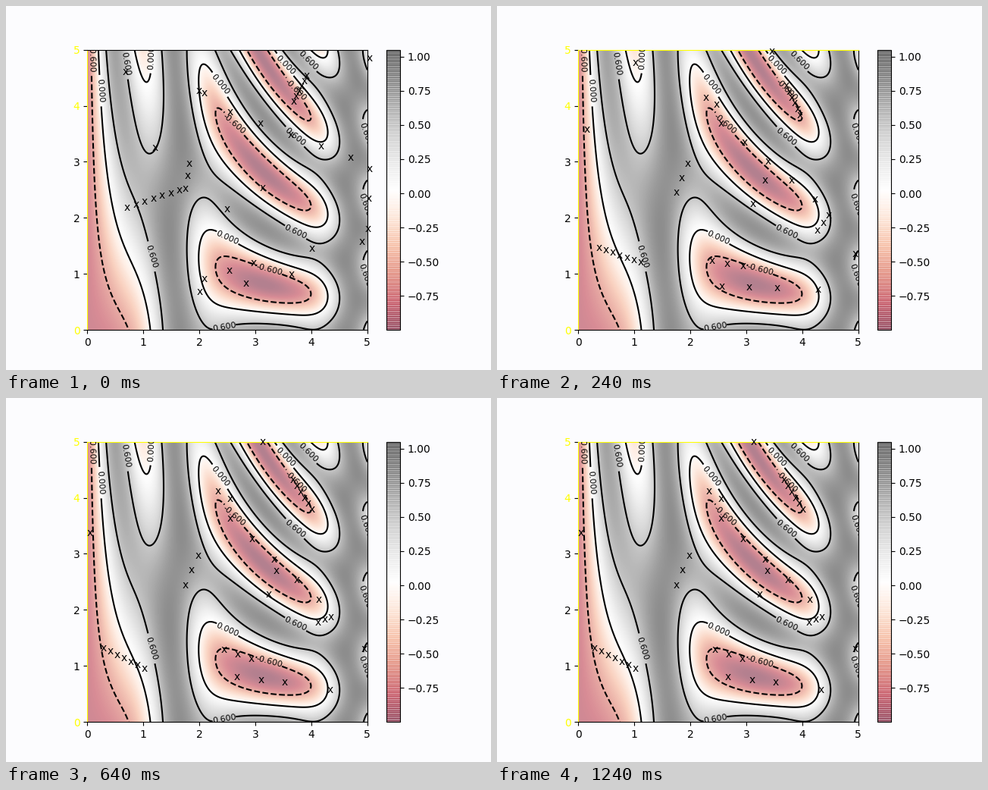
Recreate the animation shown at these times as a matplotlib script. Size 640 by 480 pixels, loop 1.28 s.

```python
import numpy as np
import matplotlib.pyplot as plt
from matplotlib.animation import FuncAnimation

FRAMES, STEP = 32, 40
PACE = 4.48       # frames in which the walkers cover most of their way
YELLOW = "#ffff00"

# Walkers travel in rows: count, both ends of the row at first and at rest.
ROWS = [
    (2, (0.63, 4.55), (1.15, 3.20), (-0.004, 3.32), (0.93, 5.02)),
    (7, (0.66, 2.13), (1.59, 2.44), (0.24, 1.26), (0.96, 0.90)),
    (3, (1.70, 2.47), (1.77, 2.91), (1.70, 2.39), (1.92, 2.91)),
    (2, (1.94, 4.21), (2.04, 4.17), (2.28, 4.06), (2.49, 3.93)),
    (5, (2.50, 3.83), (4.65, 3.02), (2.49, 3.58), (4.08, 2.12)),
    (2, (2.44, 2.10), (3.07, 2.48), (3.18, 2.22), (3.32, 2.64)),
    (3, (4.96, 1.75), (4.99, 2.82), (4.07, 1.72), (4.30, 1.82)),
    (2, (4.85, 1.52), (3.96, 1.39), (4.89, 1.25), (4.28, 0.52)),
    (6, (3.86, 4.48), (3.63, 4.02), (3.62, 4.27), (3.96, 3.73)),
    (1, (4.99, 4.79), (4.99, 4.79), (3.08, 4.94), (3.08, 4.94)),
    (3, (2.03, 0.86), (2.92, 1.14), (2.39, 1.24), (2.88, 1.07)),
    (3, (1.96, 0.63), (3.59, 0.93), (2.62, 0.74), (3.47, 0.65)),
]

start = np.vstack([np.linspace(a, b, n) for n, a, b, _, _ in ROWS])
rest = np.vstack([np.linspace(c, d, n) for n, _, _, c, d in ROWS])


def height(x, y):
    return np.sin(x) ** 10 + np.cos(10 + y * x) * np.cos(x)


def positions(i):
    return rest + (start - rest) * np.exp(-(i / PACE) ** 2)


fig, ax = plt.subplots(figsize=(6.4, 4.8), dpi=100, facecolor="#fcfcfe")
axis = np.linspace(0, 5, 500)
X, Y = np.meshgrid(axis, axis)
Z = height(X, Y)

lines = ax.contour(X, Y, Z, levels=[-0.6, 0, 0.6], colors="black")
ax.clabel(lines, inline=True, fontsize=8, fmt="%1.3f")
image = ax.imshow(Z, extent=[0, 5, 0, 5], origin="lower", cmap="RdGy",
                  alpha=0.5)
ax.set(xlim=(0, 5), ylim=(0, 5), xticks=range(6), yticks=range(6))

# Translucent colour bar with fine darker stripes
bar = fig.colorbar(image)
stripes = np.linspace(Z.min(), Z.max(), 143)[1:-1]
bar.ax.hlines(stripes, 0, 1, colors=image.cmap(image.norm(stripes)),
              alpha=0.5, linewidth=0.72)

fig.canvas.draw()
ax.spines["left"].set_color(YELLOW)
for value in (0, 4, 5):
    tick = ax.yaxis.get_major_ticks()[value]
    tick.label1.set_color(YELLOW)
    tick.tick1line.set_color(YELLOW)

# An annotation shows only while its anchor lies inside the axes.
marks = [ax.annotate("x", xy) for xy in start]


def update(i):
    for mark, xy in zip(marks, positions(i)):
        mark.xy = tuple(xy)
        mark.set_position(xy)
    ax.spines["top"].set_color(YELLOW if i else "black")
    return marks


anim = FuncAnimation(fig, update, frames=FRAMES, interval=STEP,
                     init_func=lambda: marks, repeat=True, repeat_delay=0)
plt.show()
```
